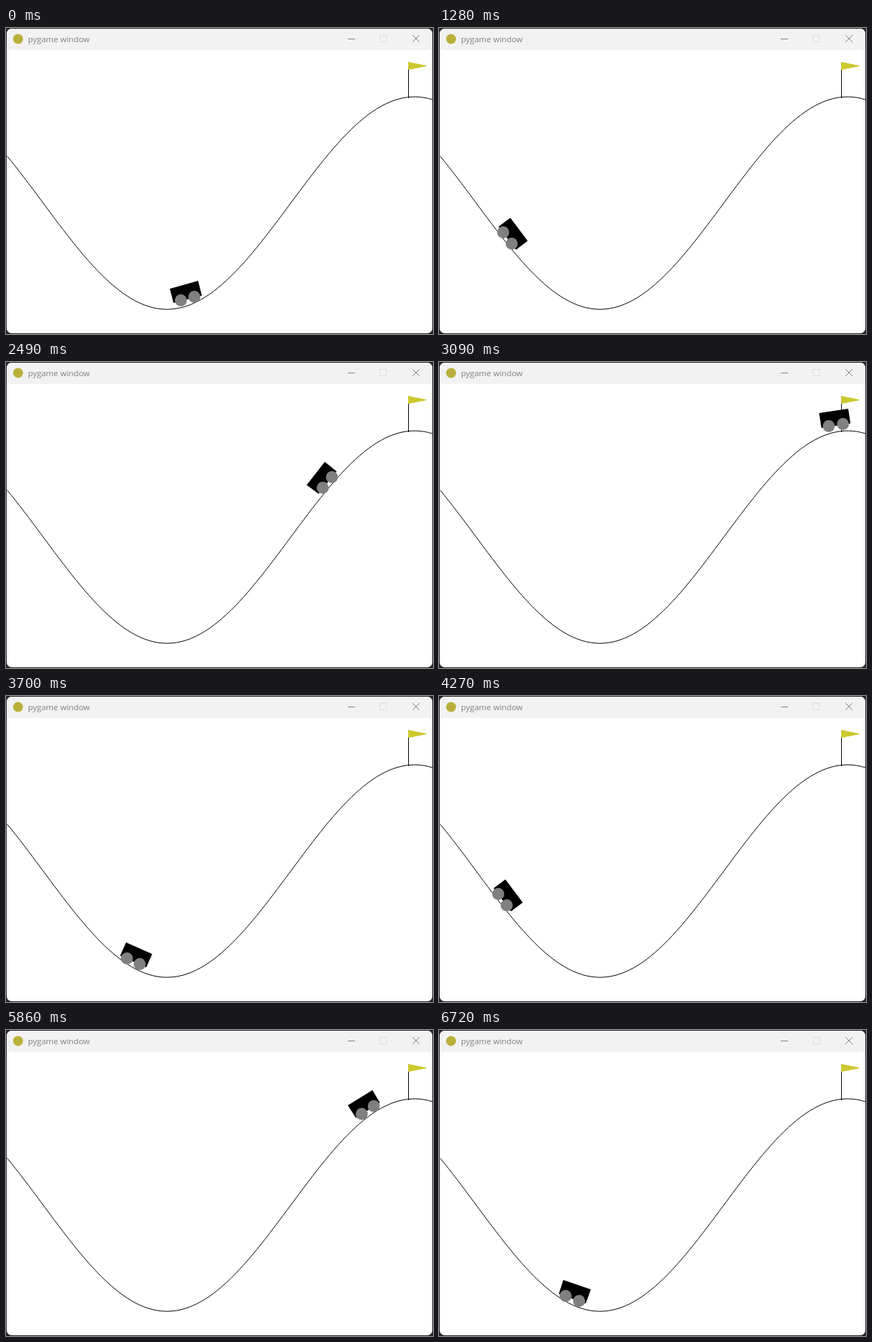
Write an HTML page that moves like this. It is 602x432 px and loops after 6.74 s.

```html
<!DOCTYPE html>
<html lang="en">
<head>
<meta charset="utf-8">
<title>Mountain car</title>
<style>
  html, body { margin: 0; width: 100%; height: 100%; overflow: hidden; background: #262626; }
  svg { display: block; width: 602px; height: 432px; }
  text { font: 11.5px "Open Sans", "Noto Sans", sans-serif; fill: #808080; }
</style>
</head>
<body>
<svg viewBox="0 0 602 432">
  <rect width="602" height="432" fill="#262626"/>
  <rect x="1" y="1" width="600" height="430" rx="7" fill="#fff"/>
  <path d="M1 31V8a7 7 0 0 1 7-7H594a7 7 0 0 1 7 7V31Z" fill="#f2f2f2"/>
  <circle cx="17" cy="15.5" r="7" fill="#b9b03a"/>
  <text x="31" y="20">pygame window</text>
  <g fill="none">
    <path d="M482 15.5H492" stroke="#808080"/>
    <rect x="527.5" y="10.5" width="9" height="9" stroke="#dedede"/>
    <path d="M573 10L583 20M583 10L573 20" stroke="#808080"/>
    <polyline id="track" stroke="#000"/>
    <path d="M567.5 48V99" stroke="#000"/>
  </g>
  <path d="M567.5 48.5L592.5 53.5L567.5 58.5Z" fill="#ccc82e" stroke="#ccc82e" stroke-linejoin="round"/>
  <polygon id="body" stroke="#000" stroke-linejoin="round"/>
  <g fill="#808080">
    <circle id="rear" r="8.5"/>
    <circle id="front" r="8.5"/>
  </g>
</svg>
<script>
const LOOP = 6740, STEP = 31.3, SCALE = 600 / 1.8, CLEARANCE = 10;
const $ = id => document.getElementById(id);

// World position to stage pixels
const stageX = x => 1.5 + (x + 1.2) * SCALE;
const stageY = x => 430.5 - (Math.sin(3 * x) * 0.45 + 0.55) * SCALE;

// Each run pushes left until step `turn`, then right; knots are [step, position]
const runs = [
  { turn: 48, knots: [[0, -0.435], [40, -0.9125], [79, 0.156], [100, 0.51]] },
  { turn: 147, knots: [[101, -0.416], [118, -0.6645], [136, -0.9345],
                       [165, -0.3045], [176, 0.069], [197, 0.519]] },
  { turn: Infinity, knots: [[200, -0.602], [214, -0.639]] }
];

// Car dynamics from one step to another
function drive(from, to, x, v, turn) {
  const path = [x];
  for (let k = from; k < to; k++) {
    v += (k < turn ? -0.001 : 0.001) - 0.0025 * Math.cos(3 * x);
    x += v;
    path.push(x);
  }
  return path;
}

// Find the starting speed that joins two knots
function join([from, x0], [to, x1], turn) {
  let low = -0.07, high = 0.07, path;
  for (let i = 0; i < 40; i++) {
    const v = (low + high) / 2;
    path = drive(from, to, x0, v, turn);
    if (path.at(-1) < x1) low = v; else high = v;
  }
  return path;
}

const positions = [];
for (const { turn, knots } of runs) {
  // The car rests at the flag until the next run
  while (positions.length < knots[0][0]) positions.push(positions.at(-1));
  for (let i = 1; i < knots.length; i++) {
    positions.splice(knots[i - 1][0], 1, ...join(knots[i - 1], knots[i], turn));
  }
}

function drawCar(x) {
  const angle = Math.cos(3 * x), c = Math.cos(angle), s = Math.sin(angle);
  const cx = stageX(x), cy = stageY(x) - CLEARANCE;
  // Points snap to whole pixels
  const place = (dx, dy) => [
    Math.floor(cx + dx * c - dy * s - 0.5) + 0.5,
    Math.ceil(cy - dx * s - dy * c - 0.5) + 0.5
  ];
  $("body").setAttribute("points",
    [[-20, 0], [-20, 20], [20, 20], [20, 0]].map(p => place(...p)).join(" "));
  for (const [id, dx] of [["rear", -10], ["front", 10]]) {
    const [wx, wy] = place(dx, 0);
    $(id).setAttribute("cx", wx);
    $(id).setAttribute("cy", wy);
  }
}

const track = Array.from({ length: 100 }, (_, i) => {
  const x = -1.2 + 1.8 * i / 99;
  return [Math.min(stageX(x), 601), stageY(x)];
});
$("track").setAttribute("points", track.join(" "));

const begin = performance.now();
function tick() {
  const step = Math.floor((performance.now() - begin) % LOOP / STEP);
  drawCar(positions[Math.min(step, positions.length - 1)]);
  requestAnimationFrame(tick);
}
tick();
</script>
</body>
</html>
```
